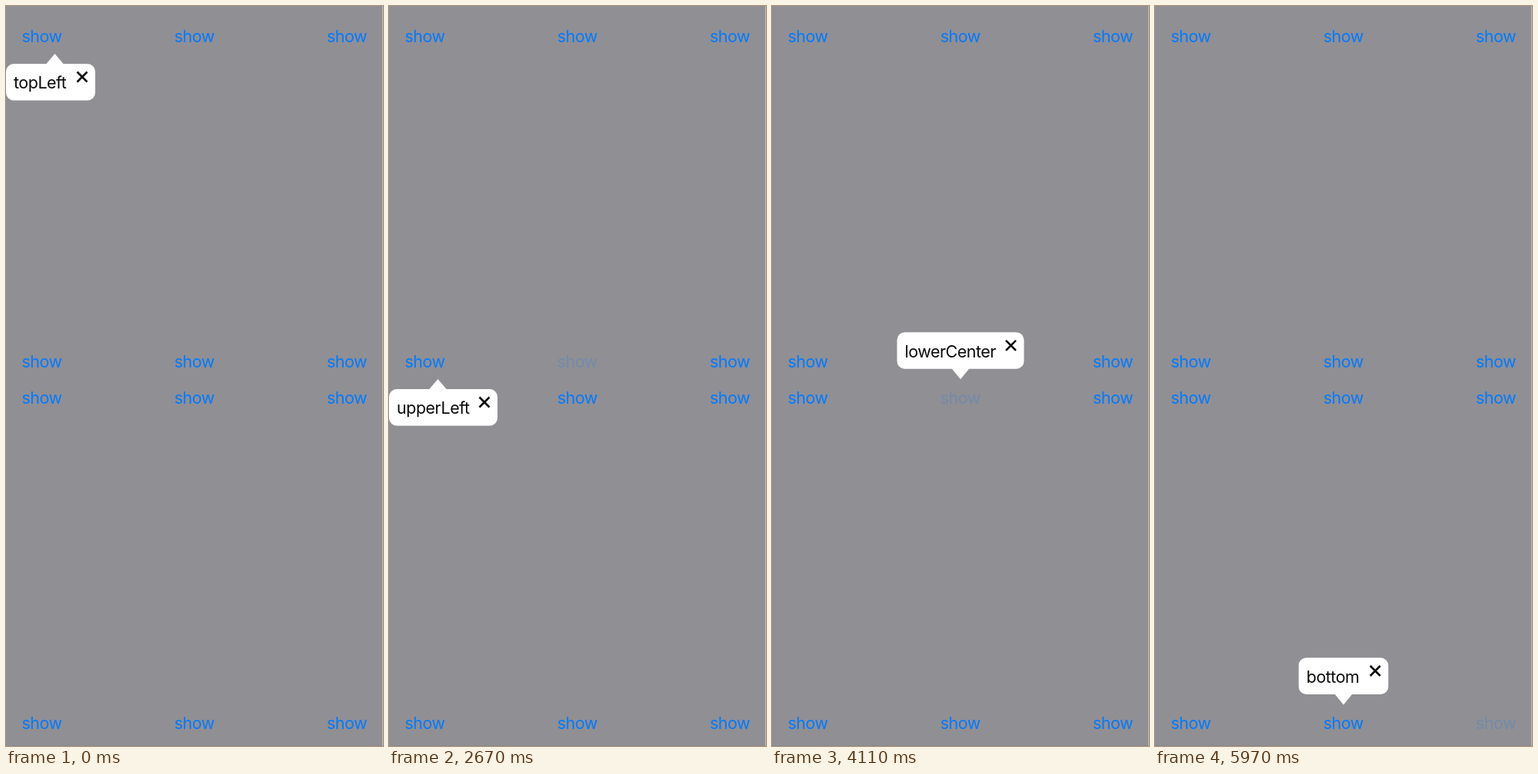
Write an HTML page that moves like this. It is 490 by 960 pixels and loops after 6000 ms.

```html
<!DOCTYPE html>
<html lang="en">
<head>
<meta charset="utf-8">
<title>Tooltip positions</title>
<style>
  html, body { margin: 0; width: 100%; height: 100%; overflow: hidden; background: #908f94; }
  svg { display: block; width: 490px; height: 960px; }
  text { font: 21.5px Inter, Roboto, sans-serif; letter-spacing: -0.5px; }
  .button { fill: #007aff; text-anchor: middle; }
  .bubble { fill: #fff; }
  .label { fill: #0a0a0a; }
  .close { fill: none; stroke: #0a0a0a; stroke-width: 2.6; }
</style>
</head>
<body>
<svg id="stage" viewBox="0 0 490 960">
  <rect width="490" height="960" fill="#908f94"/>
  <rect y="959" width="490" height="1" fill="#87868b"/>
  <rect x="489.4" width="0.6" height="960" fill="#fff" opacity="0.7"/>
</svg>
<script>
const LOOP = 6000;
const FADE = 240;
const stage = document.getElementById('stage');

// Text baselines of the buttons; the first and second rows open downwards.
const rows = [
  { base: 46.5, top: 75, below: true },
  { base: 468.5, top: 497, below: true },
  { base: 516, top: 423.3 },
  { base: 938, top: 845.5 },
];
const buttonX = [46.5, 244.8, 443];
const arrowX = [63.5, 245, 426.5];

// Bubble label and width, then the times of pressing and releasing the button.
const tips = [
  ['topLeft', 116, null, 0],
  ['top', 78, 1230, 1320],
  ['topRight', 129, 1620, 1710],
  ['upperLeft', 141, 2100, 2220],
  ['upperCenter', 170.5, 2670, 2760],
  ['upperRight', 154, 3150, 3240],
  ['lowerLeft', 135.5, 3540, 3630],
  ['lowerCenter', 165, 4020, 4110],
  ['lowerRight', 148.5, 4500, 4590],
  ['bottomLeft', 155, 4920, 5010],
  ['bottom', 116.5, 5370, 5460],
  ['bottomRight', 168, 5970, LOOP],
].map(([label, width, press, release], i) =>
  ({ label, width, press, release, col: i % 3, row: rows[Math.floor(i / 3)] }));

const percent = ms => `${(ms / LOOP * 100).toFixed(4)}%`;
const hold = 'animation-timing-function: step-end';
const css = [];

function animate(id, frames) {
  css.push(`@keyframes ${id} { ${frames} }`,
    `#${id} { animation: ${id} ${LOOP}ms infinite; }`);
}

function add(markup) {
  stage.insertAdjacentHTML('beforeend', markup);
}

function addButton({ col, row, press, release }, i) {
  const id = `button${i}`;
  add(`<text id="${id}" class="button" x="${buttonX[col]}" y="${row.base}">show</text>`);
  if (press === null) return;
  const restore = release < LOOP
    ? `${percent(release)} { opacity: .2; animation-timing-function: ease-in-out }
       ${percent(release + FADE)}, 100% { opacity: 1 }`
    : `100% { opacity: .2 }`;
  animate(id, `0% { opacity: 1; ${hold} } ${percent(press)} { opacity: .2; ${hold} } ${restore}`);
}

function addTip({ label, width, col, row, release }, i) {
  if (release >= LOOP) return;
  const id = `tip${i}`;
  const x = (490 - width) * col / 2;
  const edge = row.below ? row.top + 0.5 : row.top + 47;
  const tip = row.below ? row.top - 13 : row.top + 61;
  const closeX = x + width - 17;
  const closeY = row.top + 17;
  add(`<g id="${id}">
    <rect class="bubble" x="${x}" y="${row.top}" width="${width}" height="47.5" rx="10"/>
    <path class="bubble" d="M${arrowX[col] - 11.5} ${edge}h23L${arrowX[col]} ${tip}z"/>
    <text class="label" x="${x + 10}" y="${row.top + 32.3}">${label}</text>
    <path class="close" d="M${closeX - 6.5} ${closeY - 6.5}l13 13m0 -13l-13 13"/>
  </g>`);
  const before = release ? `0% { opacity: 0; ${hold} }` : '';
  const end = tips[i + 1].release;
  const after = end < LOOP ? `${percent(end)}, 100% { opacity: 0 }` : '100% { opacity: 1 }';
  animate(id, `${before} ${percent(release)} { opacity: 1; ${hold} } ${after}`);
}

tips.forEach(addButton);
tips.forEach(addTip);
const style = document.createElement('style');
style.textContent = css.join('\n');
document.head.append(style);
</script>
</body>
</html>
```
